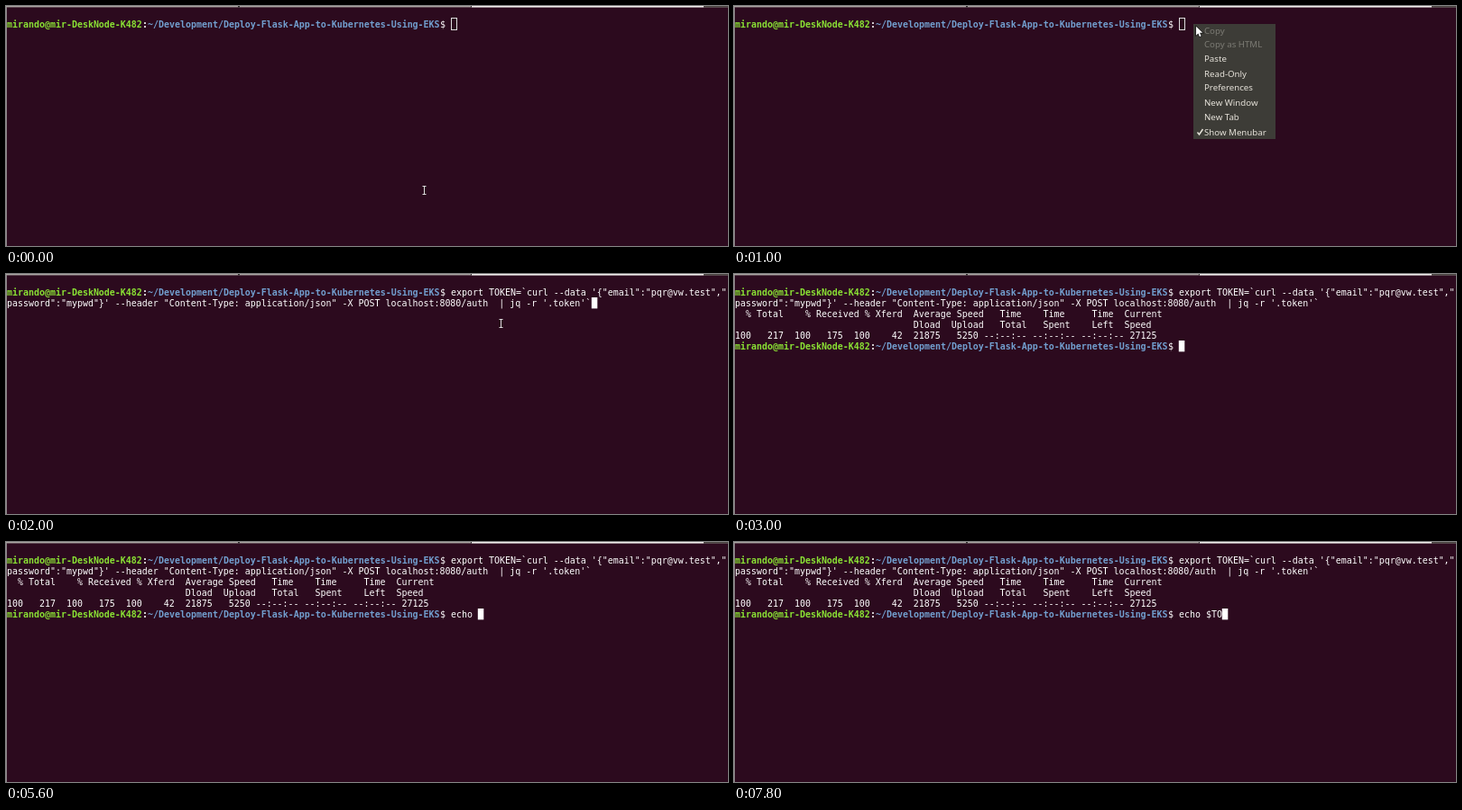
An HTML page with a canvas that plays this animation: 800 by 267 pixels, repeating every 8 s.

```html
<!DOCTYPE html>
<html lang="en">
<head>
<meta charset="utf-8">
<title>Terminal session</title>
<style>
  html, body { margin: 0; width: 100%; height: 100%; overflow: hidden; background: #2c0a1e; }
  canvas { display: block; }
</style>
</head>
<body>
<canvas id="stage" width="800" height="267"></canvas>
<script>
const ctx = document.getElementById('stage').getContext('2d');
const LOOP = 8000, STEP = 100;
const CELL = 6, LINE = 12, LEFT = 1, TOP = 14;
const MONO = '9.966px "DejaVu Sans Mono", monospace';
const WHITE = '#fff';

const USER = 'mirando@mir-DeskNode-K482';
const PATH = '~/Development/Deploy-Flask-App-to-Kubernetes-Using-EKS';
const PROMPT_COLS = USER.length + PATH.length + 3;
const COMMAND = [
  `export TOKEN=\`curl --data '{"email":"pqr@vw.test","`,
  `password":"mypwd"}' --header "Content-Type: application/json" -X POST localhost:8080/auth  | jq -r '.token'\``
];
const OUTPUT = [
  '  % Total    % Received % Xferd  Average Speed   Time    Time     Time  Current',
  '                                 Dload  Upload   Total   Spent    Left  Speed',
  '100   217  100   175  100    42  21875   5250 --:--:-- --:--:-- --:--:-- 27125'
];
const TYPED = 'echo $TO';
const KEY_TIMES = [4500, 4800, 5200, 5400, 5600, 6500, 7100, 7800];

// label and vertical centre
const MENU = [
  ['Copy', 27], ['Copy as HTML', 42.5], ['Paste', 58], ['Read-Only', 75],
  ['Preferences', 90.5], ['New Window', 107.5], ['New Tab', 123.5], ['Show Menubar', 140.5]
];

const between = (t, a, b) => t >= a && t < b;
const progress = (t, a, b) => Math.min(1, Math.max(0, (t - a) / (b - a)));
const ease = p => p * p * (3 - 2 * p);
const mix = (a, b, p) => a + (b - a) * p;

function rect(x, y, w, h, color) {
  ctx.fillStyle = color;
  ctx.fillRect(x, y, w, h);
}

function write(text, col, row, color = WHITE, weight = '') {
  ctx.font = `${weight} ${MONO}`;
  ctx.fillStyle = color;
  ctx.fillText(text, LEFT + col * CELL, TOP + row * LINE + 10);
}

function prompt(row) {
  const pathCol = USER.length + 1;
  write(USER, 0, row, '#8ae234', 'bold');
  write(':', USER.length, row, WHITE, 'bold');
  write(PATH, pathCol, row, '#729fcf', 'bold');
  write('$', pathCol + PATH.length, row);
}

function block(col, row, hollow) {
  const x = LEFT + col * CELL, y = TOP + row * LINE;
  if (!hollow) return rect(x - .2, y, CELL + .5, 12.4, WHITE);
  ctx.strokeStyle = '#ddd';
  ctx.lineWidth = 1;
  ctx.strokeRect(x + .5, y - .5, CELL, 13);
}

function beam(x, y) {
  rect(x - .5, y - 4, 1, 9, '#ddd');
  rect(x - 2, y - 5, 4, 1, '#ddd');
  rect(x - 2, y + 4, 4, 1, '#ddd');
}

function arrow(x, y) {
  const outline = new Path2D(`M${x} ${y}v10l2.3-2.1 1.6 3.6 1.7-.8-1.6-3.5h3.2z`);
  ctx.strokeStyle = '#111';
  ctx.lineWidth = 1.2;
  ctx.stroke(outline);
  ctx.fillStyle = WHITE;
  ctx.fill(outline);
}

function menu(hoverY) {
  rect(509, 20, 91, 128, '#3d3c37');
  ctx.font = '9.7px "Noto Sans", sans-serif';
  MENU.forEach(([label, y], i) => {
    if (i === 2 && hoverY >= 50) {
      const glow = ctx.createLinearGradient(0, 50, 0, 66);
      glow.addColorStop(0, '#f07f4b');
      glow.addColorStop(1, '#e4632c');
      rect(509, 50, 91, 16, glow);
    }
    ctx.fillStyle = i < 2 ? '#7c7b74' : '#e6e2da';
    ctx.fillText(label, 521, y + 3.5);
  });
  ctx.strokeStyle = '#e6e2da';
  ctx.lineWidth = 1.5;
  ctx.stroke(new Path2D('M513.5 140.5l2 2.5 4-6'));
}

function windowEdges() {
  rect(0, 0, 800, 1.4, '#aaa6a2');
  rect(516, 0, 257, 1.4, '#f2f0ee');
  rect(773, 0, 27, 1.4, '#4a4642');
  rect(257, 0, 2, 1.4, '#2c2a28');
  rect(515, 0, 1, 1.4, '#2c2a28');
  rect(0, 1, 1, 266, '#8f8a8c');
}

function pointer(t) {
  if (t < 800) {
    const p = ease(progress(t, 0, 600));
    beam(mix(463.5, 508.5, p), mix(205, 19, p));
  } else if (t < 2000) {
    const p = ease(progress(t, 900, 1400));
    const x = mix(508, 547, p), y = mix(19, 54, p);
    if (t >= 900) menu(y);
    arrow(x, y);
  } else if (t < 2200) {
    beam(548.5, 55);
  }
}

function draw(t) {
  rect(0, 0, 800, 267, '#2c0a1e');
  windowEdges();
  prompt(0);
  if (t < 2000) {
    block(PROMPT_COLS, 0, !between(t, 800, 900));
  } else {
    write(COMMAND[0], PROMPT_COLS, 0);
    write(COMMAND[1], 0, 1);
    if (t < 2600) block(COMMAND[1].length, 1);
  }
  if (t >= 3000) {
    OUTPUT.forEach((line, i) => write(line, 0, i + 2));
    prompt(5);
    const count = KEY_TIMES.filter(k => k <= t).length;
    write(TYPED.slice(0, count), PROMPT_COLS, 5);
    if (!between(t, 3600, 4200)) block(PROMPT_COLS + count, 5);
  }
  pointer(t);
}

function tick() {
  draw(Math.floor(performance.now() % LOOP / STEP) * STEP);
  requestAnimationFrame(tick);
}
tick();
</script>
</body>
</html>
```
